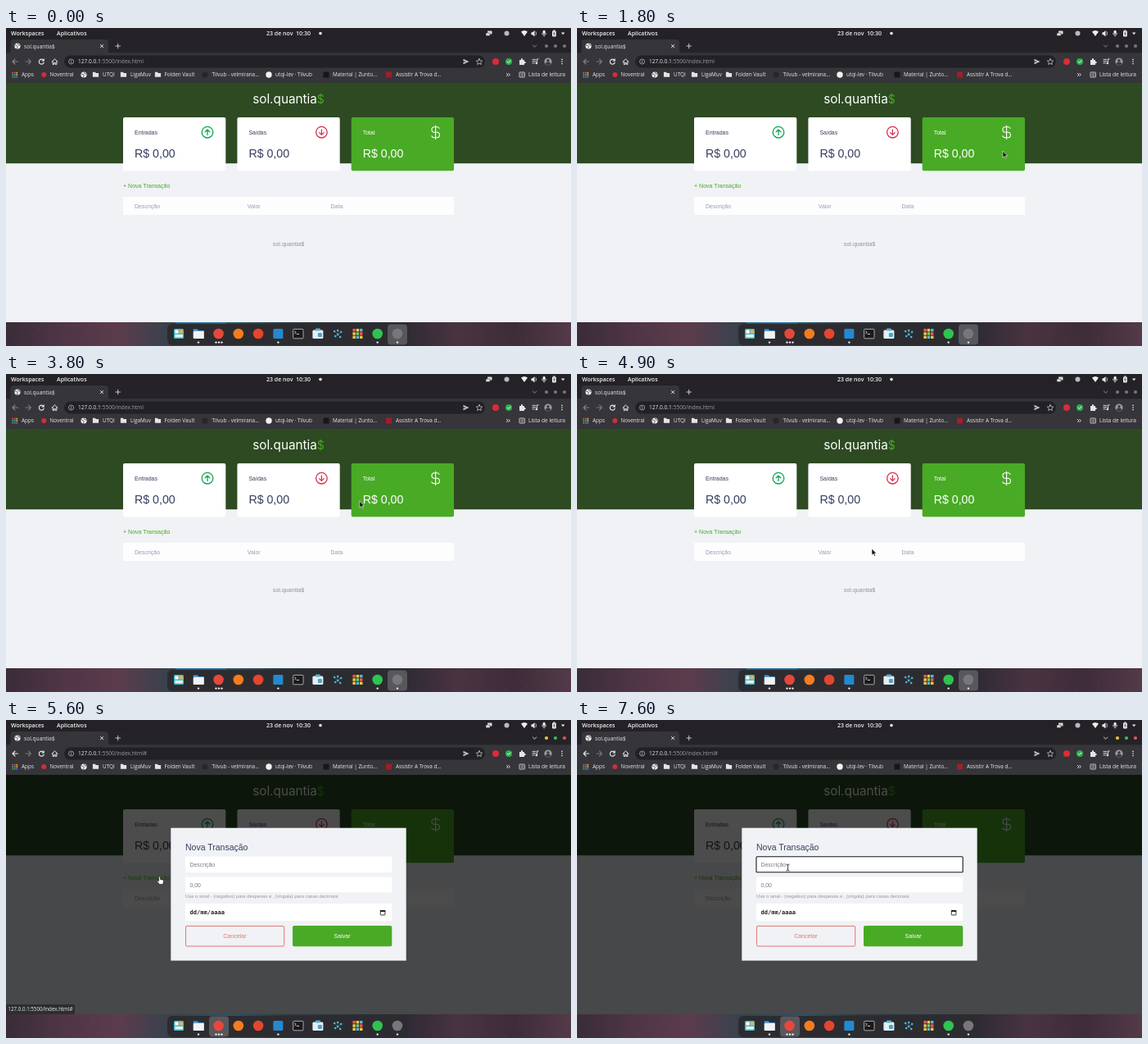
These frames come from a looping animation (690 by 388 pixels, 8 s). An HTML page:

```html
<!DOCTYPE html>
<html lang="pt-BR">
<head>
<meta charset="utf-8">
<title>Finanças</title>
<style>
  html, body { margin: 0; width: 100%; height: 100%; overflow: hidden; background: #1b1b1d; }
  svg { display: block; width: 100%; height: 100%; }
  text { white-space: pre; }
  .ui { font-family: "Open Sans", "Noto Sans", sans-serif; }
  .page { font-family: "Liberation Sans", Arial, sans-serif; }
  .mono { font-family: "DejaVu Sans Mono", monospace; font-weight: bold; }
  .logo { font-family: Inter, sans-serif; }
</style>
</head>
<body>
<svg id="stage" viewBox="0 0 690 388" xmlns="http://www.w3.org/2000/svg"></svg>
<script>
const stage = document.getElementById('stage');
const BRAND = 'sol.quantia';
const GREEN = '#49aa26', INK = '#363f5f', MUTED = '#969cb3', LIGHT = '#e8eaed', BAR = '#242127';

const rect = (x, y, w, h, fill, r = 0, more = '') =>
  `<rect x="${x}" y="${y}" width="${w}" height="${h}" rx="${r}" fill="${fill}" ${more}/>`;
const dot = (x, y, r, fill, more = '') => `<circle cx="${x}" cy="${y}" r="${r}" fill="${fill}" ${more}/>`;
const line = (d, color, w = 1, more = '') =>
  `<path d="${d}" fill="none" stroke="${color}" stroke-width="${w}" stroke-linecap="round" stroke-linejoin="round" ${more}/>`;
const shape = (d, fill) => `<path d="${d}" fill="${fill}"/>`;
const text = (x, y, size, fill, str, cls = 'page', more = '') =>
  `<text x="${x}" y="${y}" font-size="${size}" fill="${fill}" class="${cls}" ${more}>${str}</text>`;
const MID = 'text-anchor="middle"';
const group = (id, body) => `<g id="${id}">${body}</g>`;
const tiles = (x, y, step, size, colors) => Array.from({ length: 9 }, (_, i) =>
  rect(x + i % 3 * step, y + Math.floor(i / 3) * step, size, size, colors[i % colors.length])).join('');

function globe(x, y) {
  return dot(x, y, 3.6, '#f1f1f1') +
    line(`M${x - 2.6} ${y - 1}l2 .6 1 1.4-1 1.6M${x + .4} ${y - 3}l.6 1.6 1.8.4`, '#4b4d52', .9);
}

function topBar() {
  return rect(0, 0, 690, 14, BAR) +
    text(6, 9.2, 7, '#f2f2f2', 'Workspaces', 'ui', 'font-weight="600"') +
    text(62, 9.2, 7, '#f2f2f2', 'Aplicativos', 'ui', 'font-weight="600"') +
    text(345, 9.2, 7, '#f2f2f2', '23 de nov  10:30', 'ui', 'font-weight="600" ' + MID) +
    dot(384, 6.6, 1.8, '#eee') +
    rect(588, 3.5, 5.5, 4, '#ddd', .6) + rect(586, 6, 5, 3.6, '#ddd', .6, `stroke="${BAR}" stroke-width=".5"`) +
    dot(611.5, 6.6, 3, '#b9bac0') +
    shape('M629 4.6Q633 1.6 637 4.6L633 10Z', '#eee') +
    shape('M641.5 5.2h1.6l2.4-2.2v7.4l-2.4-2.2h-1.6z', '#eee') + line('M647 4.6q1.4 2 0 4', '#eee', .8) +
    rect(655.6, 2.8, 3, 4.6, '#eee', 1.5) + line('M654.4 6.4q.4 2.4 2.7 2.4t2.7-2.4M657.1 9v1.3', '#eee', .7) +
    rect(667, 3.4, 4.8, 7, '#eee', .8) + rect(668.4, 2.4, 2, 1.4, '#eee') +
    line('M669.8 4.8l-1.2 2h1.6l-1 2', BAR, .7) +
    shape('M678 5.4h4.4l-2.2 2.8z', '#eee');
}

function toolbar() {
  return rect(0, 13, 690, 19, '#252328') + rect(0, 30.2, 690, 36.8, '#35353a') +
    shape('M3 31q2.5 0 2.5-3V18q0-4 4-4H121q4 0 4 4v10q0 3 2.5 3z', '#35353a') +
    globe(14, 22) + text(22, 24.5, 6.6, LIGHT, BRAND + '$', 'ui') +
    line('M115.4 20.4l3.4 3.4m0-3.4l-3.4 3.4', LIGHT, .9) +
    line('M136.7 19.2v5.6M133.9 22h5.6', '#d5d6d8', .9) +
    line('M643.4 21l2.2 2.2 2.2-2.2', '#b8b9bc', .9, 'id="chevron"') +
    group('controls', [660, 671, 682].map(x => dot(x, 22, 2.1, '#75767a')).join('')) +
    line('M14.4 41H8.2M11 38l-3 3 3 3', '#84868b', 1.1, 'id="back"') +
    line('M24 41h6.2M27.4 38l3 3-3 3', '#76787d', 1.1) +
    line('M45.8 39.4A3 3 0 1 0 46.2 42M46.2 37.8v2.2h-2.2', LIGHT, 1.1) +
    line('M56 41.2l3.5-3.4 3.5 3.4M57.2 40.8v3.6h1.6v-2h1.4v2h1.6v-3.6', LIGHT, 1) +
    rect(71, 33.5, 514, 15, '#222126', 7.5) +
    dot(79.6, 41, 3, 'none', 'stroke="#b4b6ba" stroke-width=".8"') + line('M79.6 40.7v1.8M79.6 39.3v.1', '#b4b6ba', .8) +
    `<text x="88" y="43.3" font-size="6.6" class="ui" fill="${LIGHT}">127.0.0.1<tspan fill="#9aa0a6">:5500/index.html</tspan><tspan id="hash" fill="#9aa0a6">#</tspan></text>` +
    shape('M558.5 37.8l7 3.2-7 3.2v-2.5l4-.7-4-.7z', '#c5c7ca') +
    line('M578 37.4l1.1 2.4 2.6.3-1.9 1.8.5 2.6-2.3-1.3-2.3 1.3.5-2.6-1.9-1.8 2.6-.3z', '#c5c7ca', .8) +
    dot(598, 41, 4, '#dd2b38') + dot(614, 41, 4, '#2fae4e') + line('M612.2 41l1.4 1.4 2.4-2.6', '#fff', 1) +
    shape('M627 39h2q-.6-2 1-2t1 2h2v2q1.8-.5 1.8 1t-1.8 1v2h-6z', '#e4e5e7') +
    line('M643 38.4h4M643 40.6h4M643 42.8h2.2M648.6 42.8v-5h1.6', LIGHT, .9) + dot(647.8, 43, 1.3, LIGHT) +
    dot(662, 41, 4.6, '#9b9da0') + dot(662, 39.6, 1.7, '#3a3b3e') + shape('M658.6 44q.5-2.8 3.4-2.8t3.4 2.8q-3.4 2.8-6.8 0', '#3a3b3e') +
    [38.4, 41, 43.6].map(y => dot(679, y, .8, LIGHT)).join('');
}

function bookmarks() {
  const mark = (x, str) => text(x, 59.3, 6.4, LIGHT, str, 'ui');
  const folder = x => shape(`M${x - 3.6} 53.8h3l1 1.2h3.2v4.8h-7.2z`, '#e3e4e6');
  return tiles(7.4, 53.8, 2.5, 1.7, ['#e8554a', '#e8554a', '#f0b93a', '#49ad5a', '#4b8df0', '#f0b93a', '#49ad5a', '#49ad5a', '#4b8df0']) +
    mark(19, 'Apps') + dot(46.3, 57, 3, '#cf2f38') + mark(53.5, 'Noventral') +
    globe(95, 57) + folder(109.5) + mark(118, 'UTQI') + folder(143.5) + mark(152, 'LigaMuv') +
    folder(185.5) + mark(193.5, 'Folden Vault') +
    dot(243, 57, 3.6, '#26272a') + mark(251.5, 'Tilvub - velmirana...') +
    dot(321, 57, 3.7, '#f2f2f2') + mark(329, 'utqi-lev · Tilvub') +
    rect(387.5, 53.5, 7, 7, '#17171b') + mark(399, 'Material | Zunto...') +
    rect(464, 53.5, 7, 7, '#a31d26') + mark(476, 'Assistir A Trova d...') +
    line('M611.4 55.4l1.6 1.6-1.6 1.6M613.8 55.4l1.6 1.6-1.6 1.6', LIGHT, .9) +
    rect(627, 54, 6.4, 6, 'none', .6, `stroke="${LIGHT}" stroke-width=".8"`) + line('M629 56h2.8M629 58h2.8', LIGHT, .7) +
    text(638, 59.3, 6.6, LIGHT, 'Lista de leitura', 'ui');
}

function card(x, label, icon, fill, ink) {
  return rect(x, 109, 125.3, 65.3, fill, 2) + text(x + 14, 129.6, 7, ink, label) +
    text(x + 14, 157.7, 14.2, ink, 'R$ 0,00') + icon;
}

function arrowIcon(x, dir, color) {
  const y = 127.2, tip = y + 3.2 * dir;
  return dot(x, y, 6.8, 'none', `stroke="${color}" stroke-width="1.35"`) +
    line(`M${x} ${y - 3.2 * dir}V${tip}M${x - 2.8} ${y + .4 * dir}L${x} ${tip}L${x + 2.8} ${y + .4 * dir}`, color, 1.3);
}

function page() {
  const head = (x, str) => text(x, 219.5, 7, MUTED, str);
  return rect(0, 67, 690, 292, '#f0f2f5') + rect(0, 67, 690, 98.2, '#2d4a22') +
    `<text x="345" y="91.5" font-size="15.3" class="logo" ${MID} fill="#fff">${BRAND}<tspan fill="${GREEN}" font-size="14">$</tspan></text>` +
    card(143, 'Entradas', arrowIcon(246, -1, '#12a454'), '#fff', INK) +
    card(282.4, 'Saídas', arrowIcon(385.4, 1, '#d83350'), '#fff', INK) +
    card(421.7, 'Total', line('M524.6 119v16.6M529 122.4q-.6-1.6-2.6-1.6h-3.4q-3 0-3 3.2t3 3.2h3.4q3 0 3 3.3t-3 3.3h-3.4q-2.4 0-3.2-2', '#fff', 1.1), GREEN, '#fff') +
    text(143, 195, 7.05, GREEN, '+ Nova Transação', 'page', 'id="link"') +
    rect(143, 206, 404, 22, '#fdfdfe', 1) + head(157, 'Descrição') + head(294.8, 'Valor') + head(396.5, 'Data') +
    text(345, 266.4, 7.1, '#8f92a3', BRAND + '$', 'page', MID);
}

function modal() {
  const field = (y, h) => rect(219, y, 252.3, h, '#fff', 1);
  return rect(0, 67, 690, 292, '#000', 0, 'opacity=".7"') +
    rect(201.3, 131.7, 287.4, 161.9, '#f0f2f5') + text(219, 159, 10.5, INK, 'Nova Transação') +
    field(166.5, 19.5) + text(224.5, 178.6, 6.9, '#7b7b80', 'Descrição') +
    rect(219, 166.8, 252.2, 19, 'none', 1, 'id="focus" stroke="#15161a" stroke-width="1.1"') +
    rect(224, 172, .9, 8, '#111', 0, 'id="caret"') +
    field(191.5, 18.8) + text(224.5, 203.5, 6.9, '#7b7b80', '0,00') +
    text(219, 217, 5.87, '#94969f', 'Use o sinal - (negativo) para despesas e , (vírgula) para casas decimais') +
    field(224, 21) + text(224.5, 237.3, 7.05, '#222', 'dd/mm/aaaa', 'mono') +
    rect(457.3, 232.6, 5.6, 5.4, 'none', .5, 'stroke="#222" stroke-width=".9"') + rect(457, 232, 6.2, 2, '#222') +
    rect(219.5, 251.4, 120.2, 24.6, 'none', 1.6, 'stroke="#e47470" stroke-width="1"') +
    text(279.4, 266, 7.1, '#e47470', 'Cancelar', 'page', MID) +
    rect(350, 251, 121.3, 25.3, GREEN, 2) + text(410.6, 266, 7.1, '#fff', 'Salvar', 'page', MID);
}

function wallpaper() {
  let seed = 7, stars = '';
  const rnd = () => (seed = seed * 16807 % 2147483647) / 2147483647;
  for (let i = 0; i < 50; i++) stars += dot((rnd() * 690).toFixed(1), (360 + rnd() * 28).toFixed(1), .4, '#d6c6c4', 'opacity=".35"');
  const stops = ['#3a2c38', '#4f3546', '#5c3c4c', '#33424e', '#2a5468', '#283640', '#28303a', '#2c2a33', '#4a3341', '#3e2c39', '#543a48']
    .map((c, i) => `<stop offset="${i / 10}" stop-color="${c}"/>`).join('');
  return `<defs><linearGradient id="sky">${stops}</linearGradient></defs>` +
    rect(0, 359, 690, 29, 'url(#sky)') + stars + rect(207, 359, 62, 1.6, '#2a6f9c', 0, 'id="glow"');
}

function dock() {
  const at = i => 211 + 24.27 * i, y = 373;
  const box = (i, c) => rect(at(i) - 6, y - 6, 12, 12, c, 1.5);
  const disc = (i, c) => dot(at(i), y, 6.3, c);
  const net = [[0, -4], [-4, -3], [4, -2], [-3, 3], [3, 4], [0, 1]];
  return rect(197, 361, 294, 26, '#2c2c30', 6) +
    rect(0, 361.5, 24, 25, '#57575c', 4, 'id="active"') +
    box(0, '#46bcc4') + rect(206.5, 368.5, 4, 4, '#fff') + rect(211.8, 368.5, 4, 4, '#f6b04c') + rect(206.5, 374, 9.3, 3.4, '#e8f4f4') +
    shape(`M${at(1) - 6.5} 367.5h5l1.5 1.5h6.5v10h-13z`, '#4f9fda') + rect(at(1) - 6.5, 370, 13, 9, '#f0f3f6', 1) +
    disc(2, '#e5483b') + disc(3, '#f57c1f') + disc(4, '#e5452f') + box(5, '#2489d0') +
    rect(at(6) - 6, 367.4, 12.4, 11.4, '#1a1a1c', 1, 'stroke="#c9c9cc" stroke-width=".8"') +
    line(`M${at(6) - 4} 370l1.6 1.4-1.6 1.4M${at(6) - 1.4} 373.4h2.4`, '#fff', .8) +
    rect(at(7) - 6.5, 368.5, 13, 10.5, '#e4eff3', 1.5) + rect(at(7) - 3, 366.5, 6, 3, '#58afd0', 1) + rect(at(7), 372, 5, 5, '#4aa3c8', 1) +
    line(`M${at(8) - 4} 370l4 4 4-3M${at(8) - 3} 376l3-2 3 3M${at(8)} 369v5`, '#3472a4', .8) +
    net.map(([a, b]) => dot(at(8) + a, y + b, 1.3, '#59b4d9')).join('') +
    tiles(at(9) - 6, 367, 4.3, 3.4, ['#ef5b4c', '#f6c945', '#54b9e0', '#f6c945', '#7ccc62']) +
    disc(10, '#2fc351') + disc(11, '#77777b') +
    [235, 256.5, 260, 263.5, 332.4, 453.7, 478].map(x => dot(x, 383.6, 1.2, '#f2f2f2')).join('');
}

function pointers() {
  const beam = 'M-1.6-4Q0-4 0-3V3Q0 4-1.6 4M1.6-4Q0-4 0-3M0 3Q0 4 1.6 4';
  return group('arrow', '<path d="M0 0V8.2L1.9 6.5 3.2 9.3 4.5 8.7 3.2 6H5.6Z" fill="#111" stroke="#fff" stroke-width=".6"/>') +
    group('beam', line(beam, '#fff', 1.6, 'opacity=".7"') + line(beam, '#111', .8)) +
    group('hand', '<path d="M-.9.6Q0-.6.9.6V3.4L4.2 4.2Q5.2 4.5 5 5.6L4.2 9.4H-.2L-2.8 6Q-3 4.6-1.7 5.1L-.9 5.8Z" fill="#fff" stroke="#111" stroke-width=".6"/>');
}

stage.innerHTML = wallpaper() + dock() + page() + toolbar() + bookmarks() + topBar() + group('modal', modal()) +
  group('status', rect(0, 347, 84, 12, '#2d2e32', 1) + text(2.5, 355.2, 6.2, '#eceded', '127.0.0.1:5500/index.html#', 'ui')) +
  group('pointer', pointers());

const el = id => document.getElementById(id);
const paint = (id, attr, value) => el(id).setAttribute(attr, value);
const show = (id, on) => paint(id, 'display', on ? 'inline' : 'none');

// time, x, y of the pointer tip
const PATH = [
  [100, 510, 366], [1000, 460, 197], [1400, 540, 165], [1800, 520, 150], [2500, 195, 153], [2700, 195, 153],
  [3100, 365, 153], [3200, 365, 153], [3400, 444, 154], [3500, 433, 153], [3700, 433, 153],
  [4600, 397, 208], [4900, 360, 213], [5400, 187.5, 191], [6000, 187.5, 191], [6600, 257.5, 180]
];

function pointerAt(t) {
  const i = PATH.findIndex(p => p[0] > t);
  if (i < 0) return PATH[PATH.length - 1].slice(1);
  if (i === 0) return PATH[0].slice(1);
  const [t0, x0, y0] = PATH[i - 1], [t1, x1, y1] = PATH[i];
  const k = (t - t0) / (t1 - t0), e = k * k * (3 - 2 * k);
  return [x0 + (x1 - x0) * e, y0 + (y1 - y0) * e];
}

const inside = (x, y, l, t, r, b) => x >= l && x <= r && y >= t && y <= b;
const PAGE_TEXT = [157, 296.5, 436].flatMap(x => [[x, 146, x + 50, 161], [x, 123, x + 28, 131]])
  .concat([[157, 213, 189, 221], [295, 213, 311, 221], [396.5, 213, 412, 221]]);

function draw(t) {
  const [x, y] = pointerAt(t);
  const clicked = t >= 5500, open = t >= 5600;
  const onLink = t < 6100 && inside(x, y, 143, 187, 201, 197);
  const onText = open ? inside(x, y, 219, 166, 471, 186) && !onLink
    : PAGE_TEXT.some(b => inside(x, y, ...b));

  show('pointer', t >= 100);
  paint('pointer', 'transform', `translate(${x.toFixed(2)} ${y.toFixed(2)})`);
  show('hand', onLink);
  show('beam', onText);
  show('arrow', !onLink && !onText);

  paint('link', 'fill', onLink ? '#3dd705' : GREEN);
  show('status', onLink || (open && t < 6300));
  show('hash', clicked);
  paint('back', 'stroke', clicked ? LIGHT : '#84868b');
  paint('chevron', 'stroke', clicked ? LIGHT : '#96979b');
  ['#f3c23c', '#3cc24e', '#ee5350'].forEach((c, i) =>
    el('controls').children[i].setAttribute('fill', clicked ? c : '#75767a'));

  show('modal', open);
  show('glow', !open);
  paint('active', 'x', open ? 248 : 466);
  show('focus', t >= 7100);
  show('caret', t >= 7100 && t < 7600);
}

function tick(now) {
  draw(Math.floor(now % 8000 / 100) * 100);
  requestAnimationFrame(tick);
}
draw(0);
requestAnimationFrame(tick);
</script>
</body>
</html>
```
